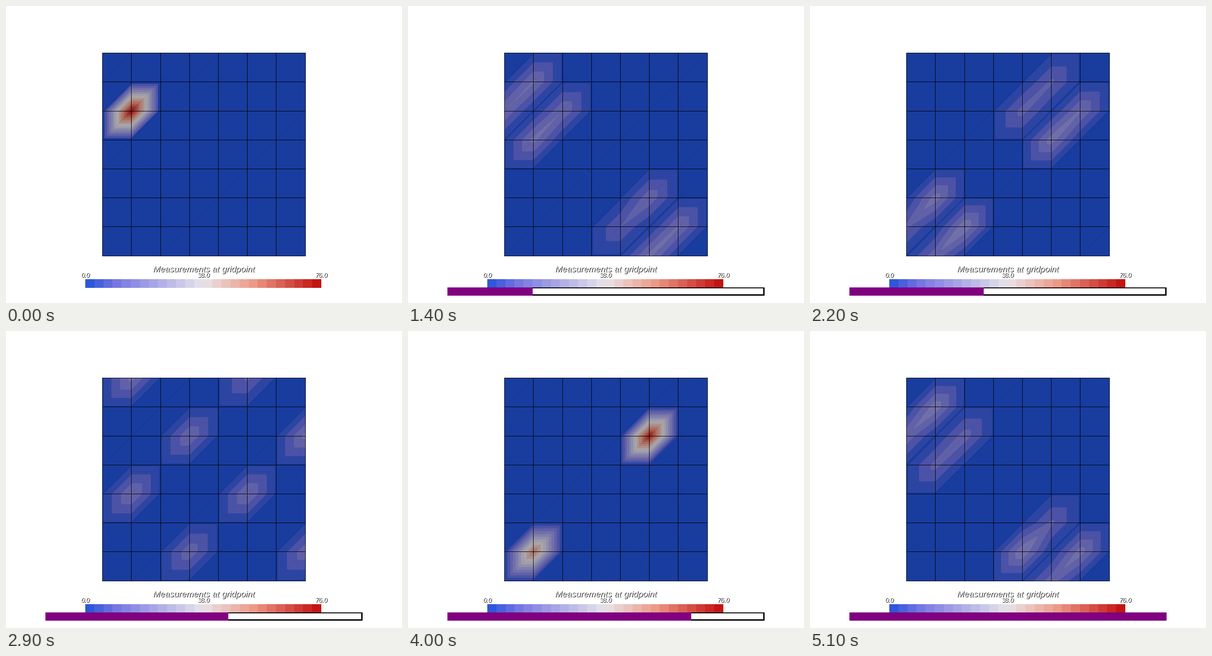
Animation, 864 px wide and 648 px high, one loop 5.2 s. Source, as a matplotlib script:

```python
import numpy as np
import matplotlib.pyplot as plt
from matplotlib.animation import FuncAnimation
from matplotlib.patches import Rectangle

W, H, DPI = 864, 648, 72
FRAMES, INTERVAL = 52, 100
STEPS = FRAMES // 2
N, SHOTS, TOP_VALUE = 8, 128, 76
LEFT, TOP, CELL = 210.6, 102.6, 63.2
SIDE = 443
BAR_X, BAR_Y, BAR_W, BAR_H = 86, 614, 692, 18
LEGEND_X, LEGEND_Y, LEGEND_W, LEGEND_H, BANDS = 173, 596, 515, 19, 26
SHADE = 0.74

# Colour scale from blue through pale grey to red
KEYS = [0, 10, 38, 54, 76]
COLORS = np.array([(35, 82, 216), (118, 118, 227), (232, 229, 234),
                   (236, 154, 136), (192, 12, 10)]) / 255
LEVELS = np.append(0.7, np.arange(5.6, TOP_VALUE, 5.2))


def scale_color(values):
    return np.stack([np.interp(values, KEYS, c) for c in COLORS.T], axis=-1)


def sites(step):
    """Occupied points: beams leave the centres, meet after four moves and scatter."""
    phase, r = divmod(step, 4)
    if phase == 0:
        centres = [(1, 2)]
    elif phase % 2:
        centres = [(5, 2), (1, 6)]
    else:
        centres = [(1, 2), (5, 6)]
    found = {((y + dy) % N, (x + dx) % N)
             for x, y in centres
             for dx, dy in ((r, 0), (-r, 0), (0, r), (0, -r))}
    return sorted(found)


def measure(step):
    points = sites(step)
    rng = np.random.default_rng(100 + step)
    counts = rng.multinomial(SHOTS, [1 / len(points)] * len(points))
    z = np.zeros((N, N))
    for point, count in zip(points, counts):
        z[point] = min(count, TOP_VALUE)
    return z


# Pixel centres in grid units, split into cell index and offset
pixels = np.arange(SIDE) + 0.5 + int(LEFT) - LEFT
grid = np.clip(pixels / CELL, 0, N - 1.001)
cell = grid.astype(int)
A, B = np.meshgrid(grid - cell, grid - cell)
COL, ROW = np.meshgrid(cell, cell)


def surface(step):
    """Linear interpolation on cells split from lower left to upper right."""
    z = measure(step)
    z00, z10 = z[ROW, COL], z[ROW, COL + 1]
    z01, z11 = z[ROW + 1, COL], z[ROW + 1, COL + 1]
    upper = z00 + A * (z10 - z00) + B * (z01 - z00)
    lower = z11 + (1 - A) * (z01 - z11) + (1 - B) * (z10 - z11)
    field = np.where(A + B < 1, upper, lower)
    levels = LEVELS if step else LEVELS[1:]
    edges = np.append(levels, TOP_VALUE)
    mids = np.append(0, (edges[:-1] + edges[1:]) / 2)
    return SHADE * scale_color(mids)[np.digitize(field, levels)]


fig = plt.figure(figsize=(W / DPI, H / DPI), dpi=DPI, facecolor="white")
ax = fig.add_axes([0, 0, 1, 1])
ax.axis("off")


def box(x, y, w, h, color, z=1):
    return ax.add_patch(Rectangle((x, y), w, h, facecolor=color, linewidth=0, zorder=z))


def label(x, y, text, size):
    for shift, color in ((1, "black"), (0, "white")):
        ax.text(x + shift, y + shift, text, color=color, size=size, ha="center",
                va="baseline", family="Liberation Sans", style="italic", zorder=4)


images = [surface(step) for step in range(STEPS)]
x0, y0 = int(LEFT), int(TOP)
plot = ax.imshow(images[0], extent=(x0, x0 + SIDE, y0 + SIDE, y0),
                 interpolation="nearest", zorder=1)
ax.set_aspect("auto")
ax.set_xlim(0, W)
ax.set_ylim(H, 0)

# Grid lines sit on whole pixels
for k in range(N):
    x, y = int(LEFT + k * CELL), int(TOP + k * CELL)
    ax.plot([x, x], [y0, y0 + SIDE], color="black", lw=1, zorder=2)
    ax.plot([x0, x0 + SIDE], [y, y], color="black", lw=1, zorder=2)

# Faint seams where the cells are split
for k in range(1, 2 * N - 2):
    a, b = max(0, k - N + 1), min(k, N - 1)
    ax.plot([LEFT + a * CELL, LEFT + b * CELL], [TOP + b * CELL, TOP + a * CELL],
            color="black", alpha=0.07, lw=0.8, zorder=1.5)

edges = np.linspace(LEGEND_X, LEGEND_X + LEGEND_W, BANDS + 1).round()
for k in range(BANDS):
    box(edges[k], LEGEND_Y, edges[k + 1] - edges[k], LEGEND_H,
        scale_color((k + 0.5) / BANDS * TOP_VALUE))

label(432, 580, "Measurements at gridpoint", 18.8)
for part in (0, 0.5, 1):
    label(LEGEND_X + 0.5 + part * LEGEND_W, 592, f"{part * TOP_VALUE:.1f}", 14)

progress = [
    box(BAR_X, BAR_Y, BAR_W, BAR_H, "black", 5),
    box(BAR_X + 2, BAR_Y + 2, BAR_W - 5, BAR_H - 5, "white", 6),
    box(BAR_X, BAR_Y, 0, BAR_H, "#800080", 7),
]


def draw(n):
    # The bar advances on odd frames, the grid on even ones
    plot.set_data(images[n // 2])
    progress[2].set_width(BAR_W * ((n + 1) // 2) / STEPS)
    for part in progress:
        part.set_visible(n > 0)
    return [plot, *progress]


anim = FuncAnimation(fig, draw, frames=FRAMES, interval=INTERVAL,
                     repeat=True, repeat_delay=0, blit=False)
plt.show()
```
